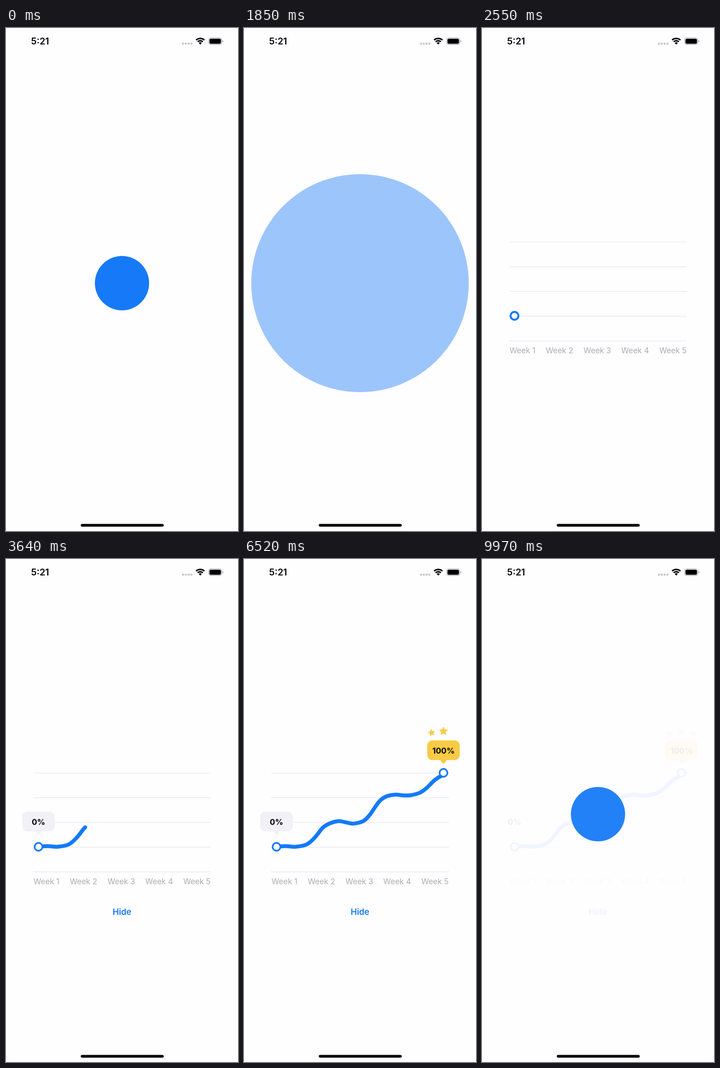
Recreate the animation shown at these times as an HTML page. Size 509 by 1101 pixels, loop 10000 ms.

```html
<!DOCTYPE html>
<html lang="en">
<head>
<meta charset="utf-8">
<title>Progress chart</title>
<style>
  html, body { margin: 0; width: 100%; height: 100%; overflow: hidden; background: #fefdff; }
  svg { display: block; width: 100vw; height: 100vh; font-family: Inter, Roboto, "Liberation Sans", sans-serif; }
  text { text-anchor: middle; }
  .clock { font-size: 20px; font-weight: 600; }
  .week { font-size: 17px; fill: #adacb1; }
  .tip text { font-size: 17.5px; font-weight: 700; fill: #050505; }
  .hide { font-size: 18.5px; font-weight: 600; fill: #147afa; }
  .dot { fill: #fefdff; stroke: #147afa; }
</style>
</head>
<body>
<svg viewBox="0 0 509 1101" preserveAspectRatio="none">
  <g id="chart">
    <g id="grid" stroke="#e5e4e9" stroke-width="1.2"></g>
    <g id="weeks"></g>
    <path id="line" pathLength="1" fill="none" stroke="#147afa" stroke-width="8.5" stroke-linecap="round" stroke-linejoin="round"/>
    <circle id="dotA" class="dot" cx="71.3" cy="630" r="8.6"/>
    <circle id="dotB" class="dot" cx="437.7" cy="468" r="8.6" stroke-width="3.6"/>
    <g id="stars" fill="#f9cb45" stroke="#f9cb45" stroke-linejoin="round"></g>
    <g id="tipA" class="tip"></g>
    <g id="tipB" class="tip"></g>
    <text id="hide" class="hide" x="254.5" y="779">Hide</text>
  </g>
  <circle id="ball" cx="254.5" cy="558.5" fill="#167af8"/>
  <g id="status">
    <text class="clock" x="74.8" y="36">5:21</text>
    <g id="signal" fill="#c9c8cc"></g>
    <path id="wifi"/>
    <rect x="444.6" y="21.6" width="28.8" height="14.6" rx="4.6" fill="none" stroke="#a2a1a4" stroke-width="1.2"/>
    <rect x="446.4" y="23.4" width="25.2" height="11" rx="2.9"/>
    <path d="M474.9 26.6Q476.8 27.4 476.8 29T474.9 31.4Z" fill="#a2a1a4"/>
  </g>
  <rect x="164" y="1085.5" width="182" height="6" rx="3"/>
</svg>
<script>
const LOOP = 10000;
const $ = id => document.getElementById(id);

function add(parent, tag, attrs, text) {
  const el = document.createElementNS("http://www.w3.org/2000/svg", tag);
  set(el, attrs);
  if (text) el.textContent = text;
  return parent.appendChild(el);
}
function set(el, attrs) {
  for (const k in attrs) el.setAttribute(k, attrs[k]);
}

// Easing and time helpers
const clamp = v => Math.min(1, Math.max(0, v));
const span = (t, from, length) => clamp((t - from) / length);
const easeOut = p => 1 - (1 - p) ** 3;

function easeInOut(p) {
  let lo = 0, hi = 1;
  for (let i = 0; i < 22; i++) {
    const s = (lo + hi) / 2;
    const x = 3 * s * (1 - s) ** 2 * 0.42 + 3 * s * s * (1 - s) * 0.58 + s ** 3;
    if (x < p) lo = s; else hi = s;
  }
  return lo * lo * (3 - 2 * lo);
}

// Underdamped spring from 0 to 1
function spring(ms) {
  if (ms <= 0) return 0;
  const t = ms / 1000, decay = 2.5, w = 9.68;
  return 1 - Math.exp(-decay * t) * (Math.cos(w * t) + decay / w * Math.sin(w * t));
}

function track(t, steps) {
  if (t <= steps[0][0]) return steps[0][1];
  for (let i = 1; i < steps.length; i++) {
    const [t0, a] = steps[i - 1], [t1, b] = steps[i];
    if (t < t1) return a + (b - a) * (t - t0) / (t1 - t0);
  }
  return steps[steps.length - 1][1];
}

// Smooth curve through points
function curve(pts) {
  let d = `M${pts[0]}`;
  for (let i = 0; i < pts.length - 1; i++) {
    const p0 = pts[i - 1] || pts[i], p1 = pts[i], p2 = pts[i + 1], p3 = pts[i + 2] || p2;
    const a = p1.map((v, k) => v + (p2[k] - p0[k]) / 6);
    const b = p2.map((v, k) => v - (p3[k] - p1[k]) / 6);
    d += `C${a} ${b} ${p2}`;
  }
  return d;
}

// Status bar
for (let i = 0; i < 4; i++)
  add($("signal"), "rect", { x: 386 + i * 6.2, y: 32, width: 4.4, height: 4.4, rx: 1.2 });

function band(inner, outer) {
  const s = Math.sin(0.75), c = Math.cos(0.75), x = 426.2, y = 36.3;
  const at = (r, side) => `${x + side * r * s} ${y - r * c}`;
  return `M${at(outer, -1)}A${outer} ${outer} 0 0 1 ${at(outer, 1)}L${at(inner, 1)}` +
    (inner ? `A${inner} ${inner} 0 0 0 ${at(inner, -1)}` : "") + "Z";
}
$("wifi").setAttribute("d", band(11.9, 15) + band(6.9, 10) + band(0, 5));

// Chart
for (let i = 0; i < 5; i++) {
  const y = 468.5 + i * 54.1;
  add($("grid"), "line", { x1: 59.5, x2: 449.5, y1: y, y2: y });
  add($("weeks"), "text", { class: "week", x: [88.8, 170, 253, 336, 419][i], y: 711.5 }, `Week ${i + 1}`);
}

$("line").setAttribute("d", curve([
  [71, 630], [92, 628.6], [114, 629.8], [138, 624.5], [156, 609], [173, 588],
  [190, 578], [208, 573.8], [224, 576.5], [240, 579.2], [262, 573.5], [276, 560],
  [289, 541], [300, 527.5], [314, 519], [333, 515.7], [348, 517.3], [366, 517],
  [386, 511.5], [401, 501], [416, 486], [427, 478], [438, 472]
]));

function makeTip(el, cx, top, fill, label) {
  add(el, "rect", { x: cx - 35.7, y: top, width: 71.4, height: 43, rx: 11.5, fill });
  add(el, "path", { d: `M${cx - 10} ${top + 42.5}q3 0 5 3.5l2.4 3.6q2.6 3 5.2 0l2.4 -3.6q2 -3.5 5 -3.5z`, fill });
  add(el, "text", { x: cx, y: top + 28.8 }, label);
}
makeTip($("tipA"), 71.3, 553, "#f2f1f8", "0%");
makeTip($("tipB"), 437.7, 397, "#f9cb45", "100%");

const starShape = Array.from({ length: 10 }, (_, i) => {
  const r = i % 2 ? 0.43 : 0.93, a = i * Math.PI / 5;
  return [r * Math.sin(a), -r * Math.cos(a)];
}).join(" ");
const stars = [
  { x: 411.5, y: 382, r: 7, tilt: -12, start: 5550 },
  { x: 437.7, y: 379.5, r: 8.4, tilt: 0, start: 6050 },
  { x: 464, y: 382, r: 7, tilt: 12, start: 6550 }
];
for (const s of stars)
  s.el = add($("stars"), "polygon", { points: starShape, "stroke-width": 0.16 });

function pop(el, p, x, y) {
  set(el, {
    opacity: clamp(p * 1.3),
    transform: `translate(${x} ${y}) scale(${p}) translate(${-x} ${-y})`
  });
}

function render(t) {
  const back = span(t, 9030, 1000);
  const grow = easeInOut(span(t, 1435, 930));
  const fade = track(t, [[1450, 1], [1700, 0.64], [1970, 0.25], [2200, 0.04], [2380, 0]]);
  set($("ball"), {
    r: t < 5000 ? 59.5 + 437 * grow : 59.5,
    opacity: t < 5000 ? fade : back
  });

  set($("chart"), {
    visibility: t >= 2550 ? "visible" : "hidden",
    opacity: 1 - back
  });
  set($("dotA"), { "stroke-width": 4.2 - 0.6 * span(t, 2550, 350) });
  pop($("tipA"), easeOut(span(t, 2600, 400)), 71.3, 604);
  set($("hide"), { opacity: span(t, 2580, 500) });

  const drawn = span(t, 3000, 2290);
  set($("line"), { "stroke-dasharray": `${drawn} 2`, opacity: drawn > 0 ? 1 : 0 });
  pop($("dotB"), easeOut(span(t, 5220, 250)), 437.7, 468);
  pop($("tipB"), easeOut(span(t, 5270, 330)), 437.7, 448);

  for (const s of stars) {
    const p = spring(t - s.start);
    set(s.el, {
      transform: `translate(${s.x} ${s.y + 20 * (1 - p)}) rotate(${s.tilt}) scale(${s.r * p})`,
      opacity: p > 0 ? 1 : 0
    });
  }
}

const begin = performance.now();
function tick() {
  render((performance.now() - begin) % LOOP);
  requestAnimationFrame(tick);
}
tick();
</script>
</body>
</html>
```
